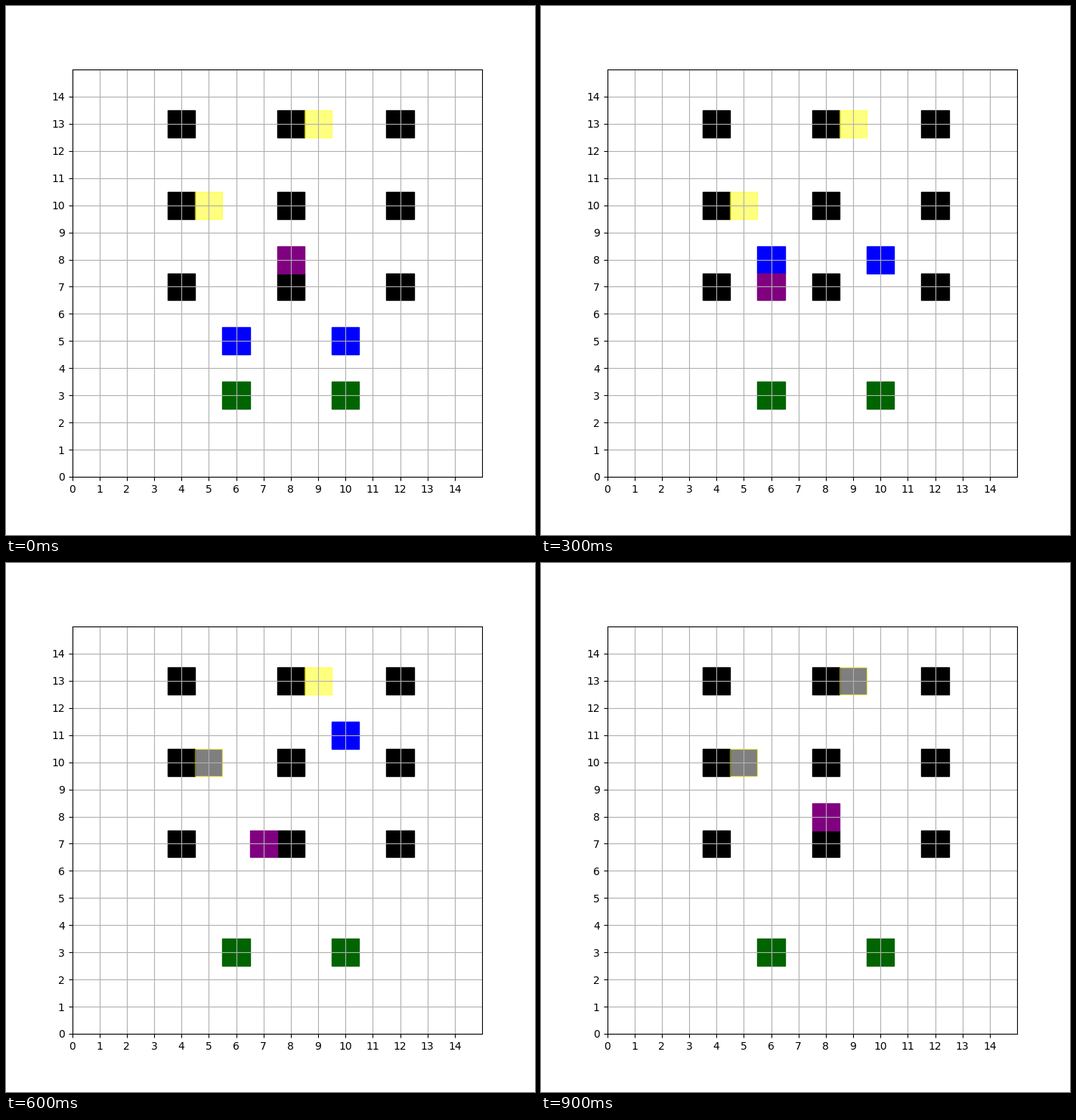
Write a matplotlib script that moves like this. It is 700x700 px and loops after 1 s.

```python
import itertools

import matplotlib.pyplot as plt
from matplotlib.animation import FuncAnimation
from matplotlib.patches import Rectangle

SIZE = 15
FRAMES = 10
START_Y = 5
OBSTACLES = itertools.product((4, 8, 12), (7, 10, 13))
BASES = [(6, 3), (10, 3)]
TARGETS = [(5, 10), (9, 13)]
WALK_START = (8, 8)
STEPS = {"L": (-1, 0), "R": (1, 0), "U": (0, 1), "D": (0, -1), "-": (0, 0)}
WALK = "LDLUDRRU-"

fig, ax = plt.subplots(figsize=(7, 7), dpi=100)
ax.set_xlim(0, SIZE)
ax.set_ylim(0, SIZE)
ax.set_xticks(range(SIZE))
ax.set_yticks(range(SIZE))
ax.grid(True)


def add_cell(x, y, color, alpha=None):
    return ax.add_patch(Rectangle((x - 0.5, y - 0.5), 1, 1, color=color, alpha=alpha))


def move_cell(cell, x, y):
    cell.set_xy((x - 0.5, y - 0.5))


def walker_position(step):
    moves = [STEPS[m] for m in WALK[:step]]
    return tuple(s + sum(m[i] for m in moves) for i, s in enumerate(WALK_START))


for x, y in OBSTACLES:
    add_cell(x, y, "black")
for x, y in BASES:
    add_cell(x, y, "darkgreen")
targets = [add_cell(x, y, "yellow", 0.5) for x, y in TARGETS]
robots = [add_cell(x, START_Y, "blue") for x, _ in BASES]
walker = add_cell(*WALK_START, "purple")


def update(step):
    y = START_Y + step
    for robot, target, (x, _), (_, goal) in zip(robots, targets, BASES, TARGETS):
        # A robot vanishes once it has passed beside its target.
        done = y > goal
        move_cell(robot, x, y)
        robot.set_visible(not done)
        target.set_facecolor("black" if done else "yellow")
    move_cell(walker, *walker_position(step))
    return [*robots, *targets, walker]


anim = FuncAnimation(fig, update, frames=FRAMES, interval=100, repeat=True)
plt.show()
```
